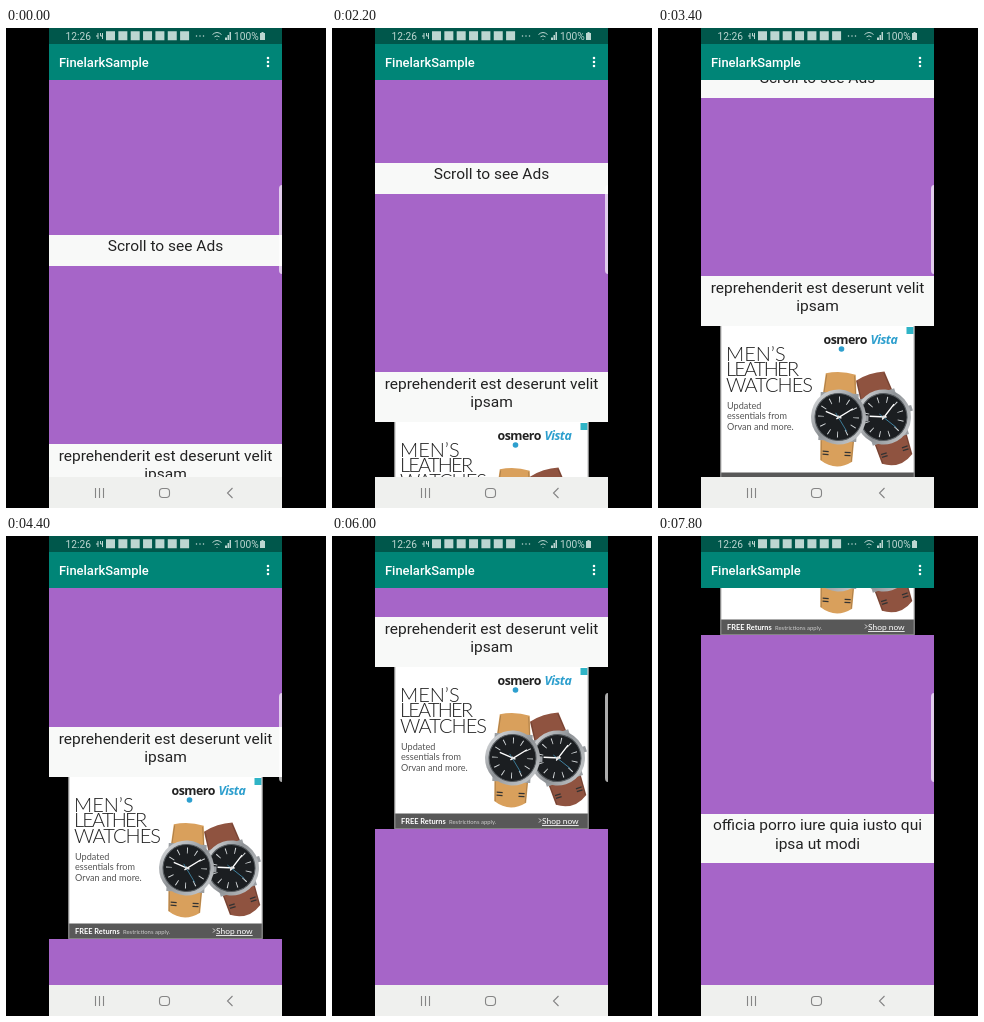
An HTML page that plays this animation: 320x480 px, repeating every 8 s.

```html
<!DOCTYPE html>
<html lang="en">
<head>
<meta charset="utf-8">
<title>Scrolling feed with an ad</title>
<style>
  html, body { margin: 0; width: 100%; height: 100%; overflow: hidden; background: #000; }
  svg { display: block; width: 320px; height: 480px; }
  text { font-family: Roboto, sans-serif; }

  .list { animation: scroll 8s infinite; }
  .card { fill: #a665c8; }
  .label { fill: #f8f9f8; }
  .caption { font-size: 15.53px; text-anchor: middle; fill: #222; }
  .title { font-size: 12.94px; font-weight: 500; fill: #fff; }
  .status { font-size: 10.2px; fill: #bcd6d1; }
  .icons { fill: none; stroke: #bcd6d1; }
  .nav { fill: none; stroke: #858585; stroke-width: 1.1; }

  .ad text { font-family: Lato, sans-serif; }
  .ad .head { font-size: 20px; font-weight: 300; fill: #222; }
  .ad .sub { font-size: 9.1px; fill: #555; }
  .ad .brand { font-family: "Open Sans", sans-serif; font-size: 12.4px; font-weight: 700; letter-spacing: -.5px; fill: #222; }
  .ad .foot { font-size: 7.4px; fill: #fff; }

  /* The feed moves in 200 ms hops: one drag per pair of stops. */
  @keyframes scroll {
    0%    { transform: translateY(0); animation-timing-function: step-end; }
    20%   { transform: translateY(0); animation-timing-function: steps(5); }
    32.5% { transform: translateY(-120px); animation-timing-function: step-end; }
    35%   { transform: translateY(-123px); animation-timing-function: steps(4); }
    45%   { transform: translateY(-183px); animation-timing-function: step-end; }
    50%   { transform: translateY(-183px); animation-timing-function: steps(2); }
    55%   { transform: translateY(-225px); animation-timing-function: steps(4); }
    65%   { transform: translateY(-333px); animation-timing-function: step-end; }
    75%   { transform: translateY(-335px); animation-timing-function: steps(4); }
    85%   { transform: translateY(-408px); animation-timing-function: step-end; }
    87.5% { transform: translateY(-433px); animation-timing-function: steps(4); }
    97.5%, 100% { transform: translateY(-529px); animation-timing-function: step-end; }
  }
</style>
</head>
<body>
<svg viewBox="0 0 320 480">
  <defs>
    <linearGradient id="steel" x1="0" y1="0" x2="1" y2="1">
      <stop offset="0" stop-color="#e4e6e8"/>
      <stop offset=".5" stop-color="#8d9195"/>
      <stop offset="1" stop-color="#d3d6d8"/>
    </linearGradient>
    <g id="watch">
      <path fill="currentColor" d="M-15-43Q0-47 15-43L17-20H-17ZM-17 20H17L16 44Q0 55-16 44Z"/>
      <path fill="none" stroke="#000" stroke-opacity=".2" d="M-14-42L-16-22M14-42L16-22M-16 24L-15 44M16 24L15 44"/>
      <path stroke="#333" stroke-width="1.3" d="M-14 35h6M8 35h6M-14 38h6M8 38h6"/>
      <path fill="#9a9ea2" d="M-19-24h6v8h-6zM13-24h6v8h-6zM-19 16h6v8h-6zM13 16h6v8h-6zM26-3h4v6h-4z"/>
      <circle r="27.5" fill="url(#steel)"/>
      <circle r="23.5" fill="#1b1e21" stroke="#555a5e"/>
      <circle r="17.5" fill="none" stroke="#d8dcde" stroke-width="6" pathLength="12" stroke-dasharray=".1 .9" stroke-dashoffset=".05"/>
      <path stroke="#fff" stroke-width="1.3" d="M3 1L-13-5M-2 2L14-9"/>
      <path stroke="#4a9fc4" stroke-width=".7" d="M-3-4L9 14"/>
      <circle r="1.5" fill="#ddd"/>
    </g>
  </defs>

  <rect width="320" height="480"/>

  <g class="list">
    <rect class="card" x="43" y="29" width="233" height="178"/>
    <rect class="label" x="43" y="207" width="233" height="31"/>
    <text class="caption" x="159.5" y="223.4">Scroll to see Ads</text>

    <rect class="card" x="43" y="238" width="233" height="178"/>
    <rect class="label" x="43" y="416" width="233" height="50"/>
    <text class="caption" y="432.6"><tspan x="159.5">reprehenderit est deserunt velit</tspan><tspan x="159.5" dy="18.4">ipsam</tspan></text>

    <g class="ad" transform="translate(62.5 466)">
      <rect width="194" height="162" fill="#fff"/>
      <g class="head">
        <text x="5.5" y="34.5">MEN’S</text>
        <text x="5.5" y="49.8" letter-spacing="-1.8">LEATHER</text>
        <text x="5.5" y="65.5" letter-spacing="-1">WATCHES</text>
      </g>
      <text class="sub" y="83"><tspan x="6.5">Updated</tspan><tspan x="6.5" dy="10.4">essentials from</tspan><tspan x="6.5" dy="10.4">Orvan and more.</tspan></text>

      <text class="brand" x="103" y="17.5">osmero</text>
      <text class="brand" x="150" y="17.5" style="fill:#2d9fce;font-style:italic">Vista</text>
      <circle cx="121" cy="23" r="2.8" fill="#2d9fce"/>
      <rect x="186" y="1" width="7" height="7" fill="#2fb4c6"/>

      <use href="#watch" transform="translate(163 91) rotate(-18)" color="#8f5340"/>
      <use href="#watch" transform="translate(118 91) rotate(3)" color="#d9a05c"/>

      <rect y="146.5" width="194" height="15.5" fill="#585858"/>
      <path d="M.5 0V161.5H193.5V0" fill="none" stroke="#999" stroke-width=".7"/>
      <text class="foot" x="6.5" y="157" font-weight="700">FREE Returns</text>
      <text class="foot" x="54.5" y="157" style="font-size:5.9px;fill:#ccc">Restrictions apply.</text>
      <path d="M144.5 151.5l2 2-2 2" fill="none" stroke="#fff" stroke-width=".8"/>
      <text class="foot" x="147.5" y="157" style="font-size:8.4px" text-decoration="underline">Shop now</text>
    </g>

    <rect class="card" x="43" y="628" width="233" height="179"/>
    <rect class="label" x="43" y="807" width="233" height="49"/>
    <text class="caption" y="823.4"><tspan x="159.5">officia porro iure quia iusto qui</tspan><tspan x="159.5" dy="18.4">ipsa ut modi</tspan></text>
    <rect class="card" x="43" y="856" width="233" height="178"/>
  </g>

  <path d="M276 157Q273 157 273 161V242Q273 246 276 246Z" fill="#fff" fill-opacity=".68"/>

  <rect x="43" width="233" height="16" fill="#00574b"/>
  <rect x="43" y="16" width="233" height="36" fill="#008577"/>
  <text class="title" x="53" y="38.5">FinelarkSample</text>
  <path d="M262 30v8.1" stroke="#fff" stroke-width="2.6" stroke-linecap="round" stroke-dasharray="0 4"/>

  <text class="status" x="59.5" y="11.6">12:26</text>
  <path class="icons" d="M90 8h2V5M92 8v3M94.500 5v3h2V5M96.500 8v3"/>
  <path class="icons" d="M100 7.700H184" stroke-width="9" stroke-dasharray="9 3.350"/>
  <path class="icons" d="M190.500 8h8" stroke-width="1.500" stroke-linecap="round" stroke-dasharray="0 3.500"/>
  <path class="icons" d="M206.500 6.500q4.500-4 9 0M208.500 8.800q2.500-2 5 0M211 11v.8"/>
  <path d="M219 12h2V9.500h-2zM221.500 12h1.500V7h-1.500zM223.500 12h1.500V4h-1.500zM254 5h1.500V4h2v1h1.500v7h-5z" fill="#bcd6d1"/>
  <text class="status" x="228" y="11.6">100%</text>

  <rect x="43" y="449" width="233" height="31" fill="#eff0ee"/>
  <path class="nav" d="M89.500 460v10M93.500 460v10M97.500 460v10M226.500 460l-5 5 5 5"/>
  <rect class="nav" x="153.500" y="460.500" width="10" height="9" rx="3.200"/>
</svg>
</body>
</html>
```
